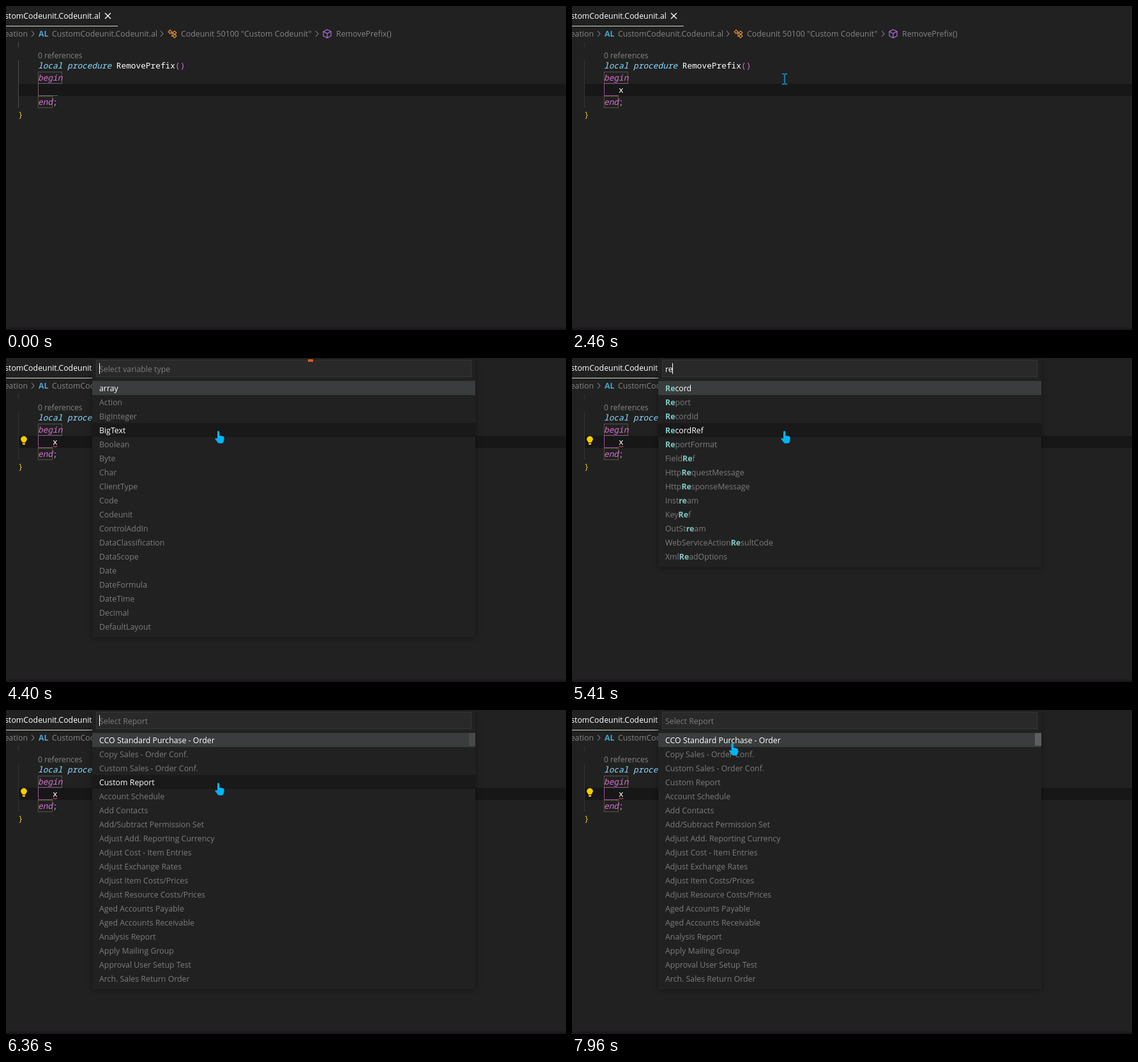
An HTML page for the animation above (8000 ms loop, 877 px wide and 508 px high).

```html
<!DOCTYPE html>
<html lang="en">
<head>
<meta charset="utf-8">
<title>Adding a variable in the editor</title>
<style>
html, body { margin: 0; width: 100%; height: 100%; overflow: hidden; background: #212121; }
svg { display: block; width: 877px; height: 508px; }
text { font: 12.35px "Open Sans", "Noto Sans", sans-serif; white-space: pre; }
.code { font: 12.8px "Noto Sans Mono", "DejaVu Sans Mono", monospace; }
.it { font-style: italic; }
.hit { font-weight: 700; fill: #80cbc4; }
.float { filter: drop-shadow(0 1px 4px rgba(0, 0, 0, .4)); }
</style>
</head>
<body>
<svg viewBox="0 0 877 508"><g id="editor"></g><g id="popup"></g><g id="mouse"></g></svg>
<script>
const LOOP = 8000;
const GREY = '#858585', WHITE = '#fff', TEAL = '#80cbc4', PINK = '#da70d6', CYAN = '#00b4f5';

const rect = (x, y, w, h, fill, more = '') =>
  `<rect x="${x}" y="${y}" width="${w}" height="${h}" fill="${fill}" ${more}/>`;
const text = (x, y, s, fill, more = '') => `<text x="${x}" y="${y}" fill="${fill}" ${more}>${s}</text>`;
const code = (x, y, s, fill, cls = '') => text(x, y, s, fill, `class="code ${cls}"`);
const line = (d, stroke, width = 1) =>
  `<path d="${d}" fill="none" stroke="${stroke}" stroke-width="${width}"/>`;
const shape = (d, fill) => `<path d="${d}" fill="${fill}"/>`;
const during = (t, ...spans) => spans.some(([a, b]) => t >= a && t < b);

const TYPES = `array,Action,BigInteger,BigText,Boolean,Byte,Char,ClientType,Code,Codeunit,ControlAddIn,
DataClassification,DataScope,Date,DateFormula,DateTime,Decimal,DefaultLayout`.split(/,\s*/);
const R_TYPES = `Record,Report,RecordId,RecordRef,ReportFormat,array,BigInteger,Char,ControlAddIn,DateFormula,
ErrorInfo,FieldRef,FilterPageBuilder,HttpHeaders,HttpRequestMessage,HttpResponseMessage,Instream,Integer`.split(/,\s*/);
const RE_TYPES = `Record,Report,RecordId,RecordRef,ReportFormat,FieldRef,HttpRequestMessage,HttpResponseMessage,
Instream,KeyRef,OutStream,WebServiceActionResultCode,XmlReadOptions`.split(/,\s*/);
const REPORTS = `CCO Standard Purchase - Order,Copy Sales - Order Conf.,Custom Sales - Order Conf.,Custom Report,
Account Schedule,Add Contacts,Add/Subtract Permission Set,Adjust Add. Reporting Currency,
Adjust Cost - Item Entries,Adjust Exchange Rates,Adjust Item Costs/Prices,Adjust Resource Costs/Prices,
Aged Accounts Payable,Aged Accounts Receivable,Analysis Report,Apply Mailing Group,
Approval User Setup Test,Arch. Sales Return Order`.split(/,\s*/);
const SUGGESTIONS = ['Attribute', 'AttributeCollection', 'CData', 'Comment', 'Declaration', 'Document',
  'DocumentType', 'Element', 'Node', 'NodeList'];

// Quick pick contents by start time
const PICKS = [
  { at: 4400, end: 5330, hint: 'Select variable type', rows: TYPES },
  { at: 5330, end: 5410, typed: 'r', caret: 151, rows: R_TYPES },
  { at: 5410, end: 5600, typed: 're', caret: 157, rows: RE_TYPES },
  { at: 5600, end: 6270, typed: 'repo', caret: 173, rows: ['Report', 'ReportFormat'] },
  { at: 6360, end: LOOP, hint: 'Select Report', rows: REPORTS },
];

function header() {
  const crumb = x => line(`M${x} 39l4 4.5-4 4.5`, GREY, 1.1);
  const node = (x, y) => rect(x, y, 4, 4, 'none', 'stroke="#e8912d" stroke-width="1.3" transform="rotate(45 ' + (x + 2) + ' ' + (y + 2) + ')"');
  return text(148, 20, 'stomCodeunit.Codeunit.al', WHITE, 'text-anchor="end"') +
    line('M155 11l9 9m0-9l-9 9', WHITE, 1.3) + rect(0, 31, 175, 1, '#d5d5cc') +
    text(34, 48, 'eation', GREY, 'text-anchor="end"') + crumb(40) +
    text(51, 47.5, 'AL', '#4aa3c7', 'style="font-weight:700"') +
    text(72, 48, 'CustomCodeunit.Codeunit.al', GREY) + crumb(242) +
    node(255, 38.5) + node(262, 40) + node(262, 45) + line('M259 42.5h3m-2 0v5h2', '#e8912d', 1.2) +
    text(274, 48, 'Codeunit 50100 "Custom Codeunit"', GREY) + crumb(485) +
    line('M503 37l6 3v7l-6 3-6-3v-7zM497 40l6 3 6-3m-6 3v7', '#b06fe0', 1.2) +
    text(517, 48, 'RemovePrefix()', GREY);
}

function editor(t) {
  const typed = t >= 1680;
  const guide = typed ? '#343434' : '#4c4c4c';
  const pairEnd = typed ? 73 : 81;
  let s = rect(0, 0, 877, 508, '#212121') + header() +
    rect(20, 122, 857, 19, '#171717') + rect(0, 504, 877, 4, '#1d181d') +
    line('M19.5 56v9m0 20v75', guide) +
    text(50, 82, '0 references', GREY, 'style="font-size:12.1px"') +
    code(50, 98, 'local procedure', '#89ddff', 'it') + code(172.8, 98, 'RemovePrefix', WHITE) +
    code(265, 98, '()', PINK) +
    rect(50.5, 103.5, 37, 18, 'none', 'stroke="#5b5340"') +
    rect(50.5, 141.5, 22, 18, 'none', 'stroke="#5b5340"') +
    line('M50 121.5h38', typed ? '#8f5a8d' : '#6f5f6e') +
    line(`M50.5 122v18.5H${pairEnd}`, typed ? '#94508f' : '#70606e') +
    code(50, 117, 'begin', PINK, 'it') + code(50, 155, 'end', PINK, 'it') +
    code(73, 155, ';', '#c79ad6') + code(19, 174.5, '}', '#e5bd50');
  if (typed) s += code(73, 136, 'x', WHITE);
  if (t >= 2860) s += line('M73 140l2-2 2 2 2-2 1.5 1.5', '#d0606e');
  if (t >= 3090) s += shape('M25.5 132.5q0-1-1.2-2.3a4.7 4.7 0 1 1 7.4 0q-1.2 1.3-1.2 2.3zM26 133.5h4v2q-2 1-4 0z', '#ffcc00');
  if (during(t, [910, 1450])) s += rect(73, 122, 2, 19, '#ffcc00');
  if (during(t, [1680, 2230], [2690, 3240], [6270, 6360])) s += rect(80, 122, 2, 19, '#ffcc00');
  return s;
}

function suggestions() {
  return `<g class="float">${rect(82, 142, 563, 189, '#212121')}</g>` + rect(82, 142, 563, 19, '#171717') +
    SUGGESTIONS.map((name, i) => {
      const y = 142 + i * 18.9;
      return line(`M86 ${y + 6}h10v7h-10z`, '#e8912d') +
        code(103, y + 14, `<tspan class="hit">X</tspan>ml${name}`, i ? '#bdbdbd' : WHITE);
    }).join('');
}

function menu() {
  return `<g class="float">${rect(73, 150, 175, 83, '#212121')}</g>` + rect(73, 151, 175, 24, '#171717') +
    ['local variable', 'global variable', 'parameter']
      .map((what, i) => text(100, 168 + 25 * i, `Add ${what} x`, i ? WHITE : TEAL)).join('');
}

function mark(name, part) {
  const i = part ? name.toLowerCase().indexOf(part) : -1;
  if (i < 0) return name;
  const j = i + part.length;
  return `${name.slice(0, i)}<tspan class="hit">${name.slice(i, j)}</tspan>${name.slice(j)}`;
}

function quickPick(t, pick, hover) {
  const { rows, typed, hint, caret = 146 } = pick;
  let s = `<g class="float">${rect(135, 0, 600, 42 + 22 * rows.length, '#212121')}</g>` +
    rect(141.5, 3.5, 587, 26, '#292929', 'stroke="#363636"') +
    text(146, 22, typed || hint, typed ? WHITE : '#7c7c7c');
  rows.forEach((name, i) => {
    const y = 36 + 22 * i, lit = i === 0 || i === hover;
    if (lit) s += rect(135, y, 600, 22, i ? '#191919' : '#3a3d3d');
    s += text(146, y + 16, mark(name, typed), lit ? WHITE : '#7c7c7c');
  });
  if (rows === REPORTS) s += rect(725, 36, 10, 20, t < 6420 ? '#484a4a' : '#5d5f5f');
  if (t < 4490) s += rect(473, 2, 8, 4, '#d9572f');
  if (!during(t, [4950, 5330], [6100, 6270], [6890, 7390], [7890, LOOP]))
    s += rect(caret, 8, 1, 17, WHITE);
  return s;
}

// Pointer path: time, x, y
const PATH = [[150, 461, 412], [760, 74, 134], [910, 74, 134], [1040, 67, 144], [1450, 333, 114],
  [7280, 333, 114], [7960, 251.5, 51.5], [LOOP, 251.5, 51.5]];

function pointer(t) {
  const i = PATH.findIndex(p => p[0] > t);
  const [t0, x0, y0] = PATH[i - 1], [t1, x1, y1] = PATH[i];
  const k = (t - t0) / (t1 - t0), e = k * k * (3 - 2 * k);
  return [x0 + (x1 - x0) * e, y0 + (y1 - y0) * e];
}

function mouse(t, x, y) {
  let s;
  if (during(t, [3470, 4400])) {
    s = shape('M0 2v14l3.4-3 2.6 5 2.2-1.2-2.4-4.6 4.7-.5z', CYAN);
  } else if (during(t, [4400, 5600], [6360, LOOP])) {
    s = shape('M-2 2q0-1.7 1.6-1.7T1.2 2V7.5l5 1q2.8.7 2.6 3L8 17q-.5 2.7-3 2.7H1q-1.6 0-2.6-1.5L-5.5 13q.3-2 2-1.4L-2 12.7z', CYAN);
  } else {
    const beam = 'M-4-7.5h3l1 1 1-1h3M0-6.5v14M-4 8.5h3l1-1 1 1h3';
    s = line(beam, '#0b4d68', 2.4) + line(beam, '#25a5d6', 1);
  }
  return `<g transform="translate(${x.toFixed(1)} ${y.toFixed(1)})">${s}</g>`;
}

const shown = {};
function show(id, markup) {
  if (shown[id] === markup) return;
  document.getElementById(id).innerHTML = shown[id] = markup;
}

function frame() {
  const t = performance.now() % LOOP;
  const [x, y] = t < 150 ? [0, 0] : pointer(t);
  const pick = PICKS.find(p => during(t, [p.at, p.end]));
  show('editor', editor(t));
  show('popup', pick ? quickPick(t, pick, Math.floor((y - 36) / 22))
    : during(t, [1850, 2460]) ? suggestions()
    : during(t, [3470, 4400]) ? menu() : '');
  show('mouse', t < 150 ? '' : mouse(t, x, y));
  requestAnimationFrame(frame);
}
frame();
</script>
</body>
</html>
```
